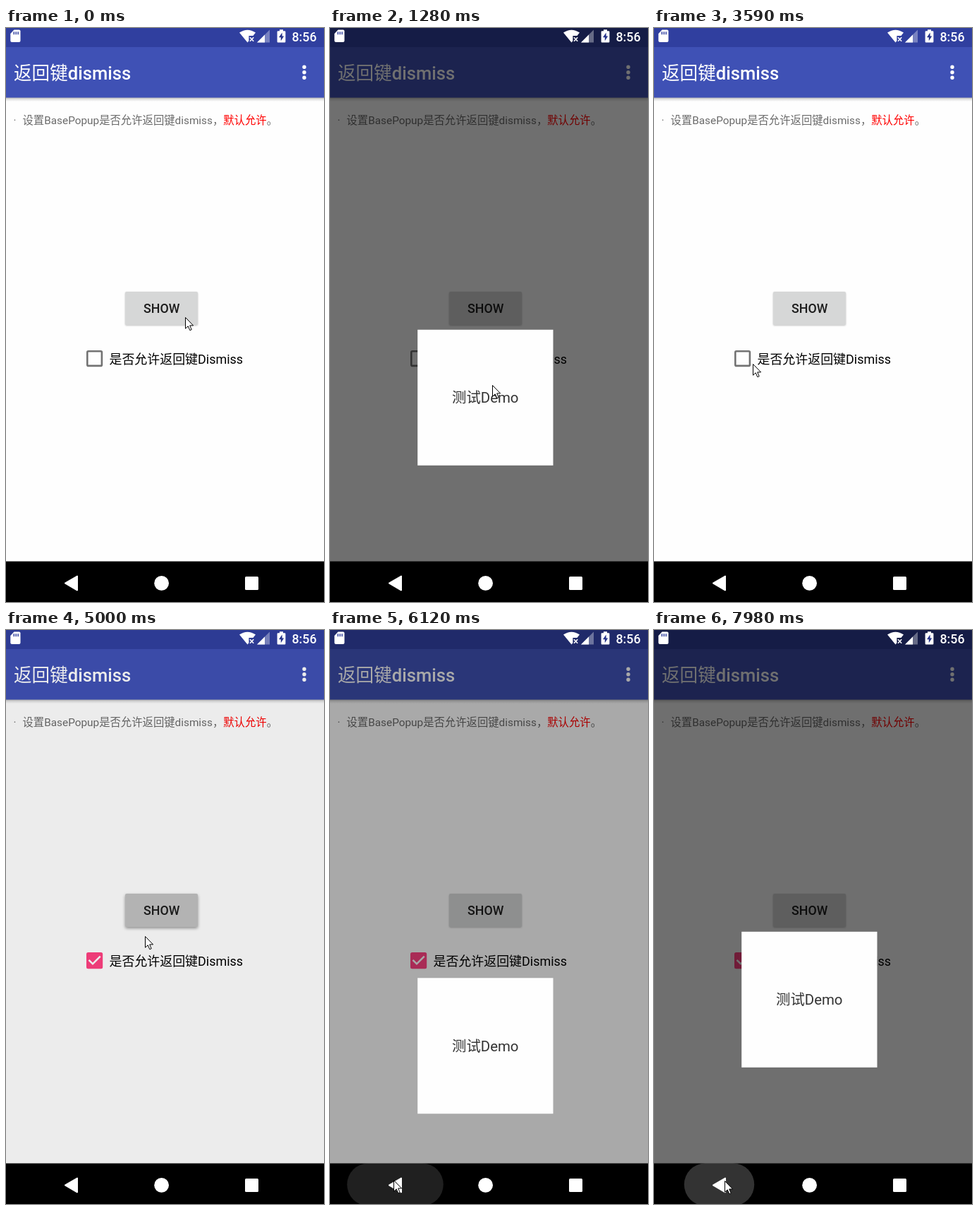
These frames come from a looping animation (451x812 px, 8 s). An HTML page:

```html
<!DOCTYPE html>
<html lang="zh">
<head>
<meta charset="utf-8">
<title>返回键dismiss</title>
<style>
  html, body { margin: 0; width: 100%; height: 100%; overflow: hidden; background: #000; }
  svg { display: block; width: 451px; height: 812px; }
  text { font-family: Roboto, "Noto Sans CJK SC", "Noto Sans CJK", sans-serif; white-space: pre; }
  .m { font-weight: 500; }
</style>
</head>
<body>
<svg viewBox="0 0 451 812">
  <defs>
    <linearGradient id="fall" x2="0" y2="1">
      <stop offset="0" stop-opacity=".32"/>
      <stop offset=".4" stop-opacity=".13"/>
      <stop offset="1" stop-opacity="0"/>
    </linearGradient>
  </defs>

  <!-- page -->
  <rect width="451" height="812" fill="#fefefe"/>
  <rect y="98" width="451" height="6" fill="url(#fall)"/>
  <rect width="451" height="27" fill="#303f9f"/>
  <rect y="27" width="451" height="71.5" fill="#3f51b5"/>
  <text x="11" y="73" font-size="25.6" fill="#fff">返回键<tspan class="m">dismiss</tspan></text>
  <path d="M423 55.3v0M423 62.8v0M423 70.3v0" stroke="#fff" stroke-width="5.4" stroke-linecap="round"/>
  <g font-size="15.35" fill="#6b6b6b">
    <text x="10.5" y="136">·</text>
    <text x="23.5" y="136">设置BasePopup是否允许返回键dismiss，<tspan fill="#f00">默认允许</tspan>。</text>
  </g>

  <rect id="button" x="169" y="373" width="103" height="47" rx="2" fill="#d6d7d7"/>
  <rect id="tint" x="169" y="373" width="103" height="47" rx="2" opacity="0"/>
  <text class="m" x="195" y="403" font-size="17.8" fill="#1c1c1c">SHOW</text>

  <circle id="halo" cx="125.5" cy="468" r="0"/>
  <rect id="empty" x="115.3" y="457.3" width="20.6" height="20.6" rx="1.5" fill="none" stroke="#737373" stroke-width="2.6"/>
  <g id="checked">
    <rect x="114" y="456" width="23.2" height="23.2" rx="2.5" fill="#ff4081"/>
    <path d="M117.500 466.800l5.500 5.500 10.700-10.700" fill="none" stroke="#fff" stroke-width="2.5"/>
  </g>
  <text x="146.500" y="474.600" font-size="17.950" fill="#000">是否允许返回键Dismiss</text>

  <!-- popup -->
  <rect id="dim" width="451" height="755" opacity="0"/>
  <g id="popup">
    <rect x="124.2" y="426.800" width="192.300" height="192" fill="#fefefe"/>
    <text x="173" y="530.300" font-size="20.400" fill="#333">测试Demo</text>
  </g>

  <!-- status icons -->
  <g fill="#fff">
    <path d="M11.5 2.5H18.5Q20.5 2.5 20.5 4.5V18Q20.5 20 18.5 20H8.3Q6.3 20 6.3 18V8Z"/>
    <path d="M11.3 5.2v4M14.2 5.2v4M17.1 5.2v4" stroke="#303f9f" stroke-width="1.5"/>
    <path d="M331 6.6Q342.5 -1.2 354 6.6L350.4 11H344.4V18.3L342.5 20.5Z"/>
    <path d="M346 13.3l5.2 5.4m0-5.4l-5.2 5.4" stroke="#fff" stroke-width="1.6"/>
    <path d="M374 2.5V20.5H356Z" opacity=".35"/>
    <path d="M367 9.5V20.5H356Z"/>
    <path d="M388 2.3h5v1.9h2.2q1.2 0 1.2 1.2V19.2q0 1.2-1.2 1.2H385.8q-1.2 0-1.2-1.2V5.4q0-1.2 1.2-1.2H388Z"/>
    <path d="M391.6 6.5L387 13.2h2.8V18.2L394.2 11.4H391.6Z" fill="#26338a"/>
    <text class="m" x="405.5" y="18.8" font-size="17.8">8:56</text>
  </g>

  <!-- navigation bar -->
  <rect y="754.5" width="451" height="58"/>
  <rect id="ripple" y="754.5" height="60" fill="#fff" opacity="0"/>
  <g fill="#fff">
    <path d="M84 785.4L101 775.5V795.3Z" stroke="#fff" stroke-width="2" stroke-linejoin="round"/>
    <circle cx="220.6" cy="785.4" r="10.4"/>
    <rect x="339" y="776" width="19" height="19" rx="1.5"/>
  </g>

  <path id="cursor" d="M.5 .5V16.2L4.2 12.8L6.8 18.7L9.2 17.7L6.7 11.9H11.6Z" fill="#fff" stroke="#000"/>
</svg>

<script>
const LOOP = 8000;
const DIM = 0.56;
const POPUP_H = 192;

const home = [254, 409];
const moves = [
  { at: 20, len: 50, to: [240, 400] },
  { at: 830, len: 450, to: [230, 504] },
  { at: 1280, len: 370, to: [91, 774] },
  { at: 2640, len: 370, to: [108, 647] },
  { at: 3180, len: 410, to: [140, 475] },
  { at: 3770, len: 80, to: [130, 474] },
  { at: 4300, len: 290, to: [198, 395] },
  { at: 4960, len: 610, to: [78, 760] },
  { at: 5670, len: 20, to: [72, 771] },
  { at: 5700, len: 100, to: [90, 778] },
  { at: 6340, len: 380, to: [195, 400] },
  { at: 6900, len: 150, to: [177, 463] },
  { at: 7310, len: 470, to: [100, 779] }
];
const popups = [
  { press: 640, show: 870, hide: 3190 },
  { press: 4790, show: 4960, hide: 5990 },
  { press: 6750, show: 6922, hide: Infinity }
];
const backTaps = [1815, 2330, 5880, 7927];
const checkTap = 4130;

const el = {};
for (const node of document.querySelectorAll("svg > [id]")) el[node.id] = node;

const set = (node, attrs) => { for (const k in attrs) node.setAttribute(k, attrs[k]); };
const ramp = (t, from, len) => Math.min(1, Math.max(0, (t - from) / len));
const ease = p => (1 - Math.cos(Math.PI * p)) / 2;
const spread = p => 1 - Math.pow(400, -1.4 * p);
const pulse = (t, from, to) => Math.min(ramp(t, from, 30), 1 - ramp(t, to, 120));

// Each move swings along a quarter ellipse: vertical first, then sideways.
function drawCursor(t) {
  let [x, y] = home;
  for (const { at, len, to } of moves) {
    const a = ramp(t, at, len) * Math.PI / 2;
    x += (to[0] - x) * (1 - Math.cos(a));
    y += (to[1] - y) * Math.sin(a);
  }
  set(el.cursor, { transform: `translate(${Math.round(x)} ${Math.round(y)})` });
}

function drawPopup(t) {
  let dim = 0, shift = 0, visible = false;
  for (const { show, hide } of popups) {
    const out = ramp(t, hide, 330);
    if (t < show || out === 1) continue;
    dim = DIM * ramp(t, show, 325) * (1 - out);
    shift = POPUP_H * (1 - ease(ramp(t, show + 130, 240)) + ease(out));
    visible = t > show + 130;
  }
  set(el.dim, { opacity: dim });
  set(el.popup, { transform: `translate(0 ${shift})`, visibility: visible ? "visible" : "hidden" });
}

function drawButton(t) {
  let lift = 0, tint = 0;
  for (const { press, show } of popups) {
    lift += pulse(t, press, show + 130);
    tint += pulse(t, show - 40, show + 130);
  }
  el.button.style.filter =
    `drop-shadow(0 ${1 + 1.5 * lift}px ${1 + lift}px rgba(0,0,0,${0.24 + 0.16 * lift}))`;
  set(el.tint, { opacity: 0.1 * tint });
}

function drawBack(t) {
  const down = backTaps.findLast(tap => tap <= t) ?? -LOOP;
  const width = 137 * spread(ramp(t, down, 350));
  set(el.ripple, {
    x: 92.5 - width / 2,
    width,
    rx: Math.min(30, width / 2),
    ry: 30,
    opacity: 0.2 * (1 - ramp(t, down + 75, 450))
  });
}

function drawCheck(t) {
  const on = ramp(t, checkTap + 90, 80);
  set(el.empty, { opacity: on > 0 ? 0 : 1 });
  set(el.checked, { opacity: on });
  set(el.halo, {
    r: 24 * spread(ramp(t, checkTap, 250)),
    opacity: 0.12 * (1 - ramp(t, checkTap + 100, 320))
  });
}

const start = performance.now();
function tick() {
  const t = (performance.now() - start) % LOOP;
  for (const draw of [drawPopup, drawButton, drawBack, drawCheck, drawCursor]) draw(t);
  requestAnimationFrame(tick);
}
tick();
</script>
</body>
</html>
```
